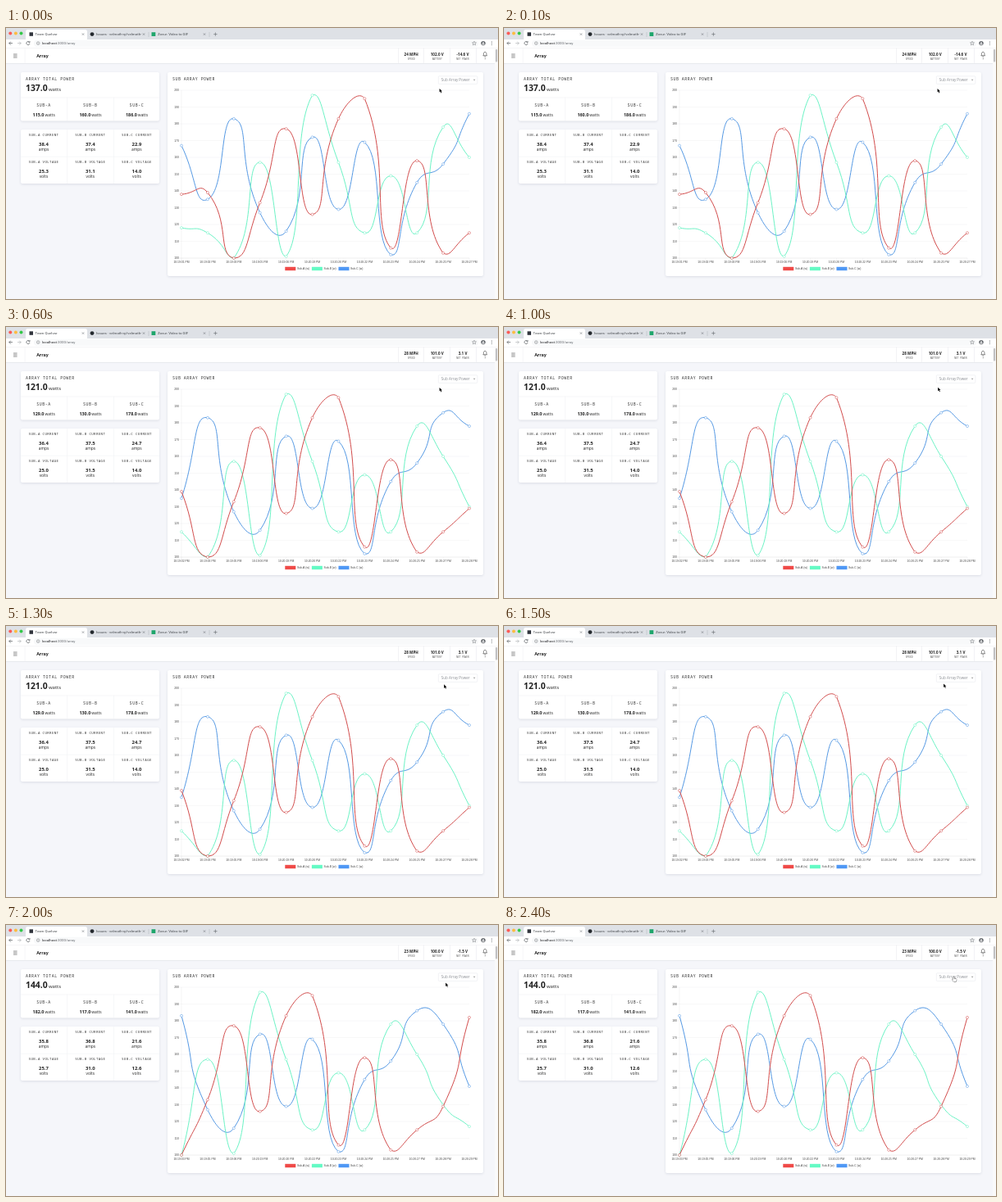
Animation, 600 px wide and 331 px high, one loop 2500 ms. Source, as an HTML page with a canvas:

```html
<!DOCTYPE html>
<html lang="en">
<head>
<meta charset="utf-8">
<title>Array dashboard</title>
<style>
html, body { margin: 0; width: 100%; height: 100%; overflow: hidden; }
canvas { display: block; width: 100vw; height: 100vh; }
</style>
</head>
<body>
<canvas></canvas>
<script>
const W = 600, H = 331, LOOP = 2500;
const canvas = document.querySelector('canvas');
const scale = window.devicePixelRatio || 1;
canvas.width = W * scale;
canvas.height = H * scale;
const ctx = canvas.getContext('2d');

const SANS = '"Open Sans", sans-serif';
const MONO = '"Noto Sans Mono", monospace';
const UI = 'Roboto, sans-serif';
const ARIAL = '"Liberation Sans", Arial, sans-serif';

const series = [
  { name: 'Sub-A (w)', line: '#d24c4c', fill: '#ef4a48',
    data: [138, 139, 100, 133, 177, 126, 183, 195, 106, 158, 103, 115, 129, 182] },
  { name: 'Sub-B (w)', line: '#6cf3c5', fill: '#64fac4',
    data: [118, 115, 100, 157, 101, 197, 157, 115, 149, 115, 178, 160, 130, 117] },
  { name: 'Sub-C (w)', line: '#5599e4', fill: '#4f98f5',
    data: [167, 135, 183, 127, 116, 172, 129, 169, 102, 145, 156, 186, 178, 141] },
];
const times = ['19:01', '19:02', '19:03', '19:05', '19:06', '20:19', '20:20',
  '20:22', '20:23', '20:24', '20:25', '20:27', '20:28', '20:29'];

const readings = [
  { total: '137.0', stats: ['24 MPH', '102.0 V', '-14.6 V'],
    current: ['38.4', '37.4', '22.9'], voltage: ['25.3', '31.1', '14.0'] },
  { total: '121.0', stats: ['28 MPH', '101.0 V', '3.1 V'],
    current: ['36.4', '37.5', '24.7'], voltage: ['25.0', '31.5', '14.0'] },
  { total: '144.0', stats: ['23 MPH', '100.0 V', '-1.5 V'],
    current: ['35.8', '36.8', '21.6'], voltage: ['25.7', '31.0', '12.6'] },
];

function text(str, x, y, size, { font = SANS, weight = 400, color = '#222', align = 'left', spacing = 0 } = {}) {
  ctx.font = `${weight} ${size}px ${font}`;
  ctx.letterSpacing = spacing + 'px';
  ctx.textAlign = align;
  ctx.fillStyle = color;
  ctx.fillText(str, x, y);
  return ctx.measureText(str).width;
}

function rect(x, y, w, h, color) {
  ctx.fillStyle = color;
  ctx.fillRect(x, y, w, h);
}

function rounded(x, y, w, h, r, color) {
  ctx.beginPath();
  ctx.roundRect(x, y, w, h, r);
  ctx.fillStyle = color;
  ctx.fill();
}

function dot(x, y, r, color) {
  ctx.beginPath();
  ctx.arc(x, y, r, 0, 7);
  ctx.fillStyle = color;
  ctx.fill();
}

function stroke(path, color, width = 0.7) {
  ctx.strokeStyle = color;
  ctx.lineWidth = width;
  ctx.stroke(new Path2D(path));
}

function card(x, y, w, h) {
  ctx.save();
  ctx.shadowColor = 'rgba(40, 50, 80, 0.12)';
  ctx.shadowBlur = 3 * scale;
  ctx.shadowOffsetY = scale;
  rounded(x, y, w, h, 2, '#fff');
  ctx.restore();
}

function browser() {
  rect(0, 0, W, 14, '#dee1e6');
  ['#fc5b57', '#fdbc40', '#34c84a'].forEach((c, i) => dot(5.3 + i * 6.6, 6.5, 2, c));
  rounded(24, 2, 75, 13, [2.5, 2.5, 0, 0], '#fff');
  rounded(28.5, 5.3, 4.5, 4.5, 0, '#30343c');
  dot(105, 7.6, 2.4, '#24292e');
  rounded(177.5, 5.2, 4.8, 4.8, 0, '#1fa66c');
  const tab = { font: UI, color: '#45494d' };
  text('Team Quelvar', 35.5, 9.2, 4.4, tab);
  text('Issues · velmoth-qi/velmoth-', 110, 9.2, 4.4, tab);
  text('Zovur: Video to GIF', 185, 9.2, 4.4, tab);
  [94, 168, 242].forEach(x => stroke(`M${x - 1.2} 6.4l2.4 2.4m0-2.4l-2.4 2.4`, '#5f6368', 0.5));
  stroke('M174 5v6M248 5v6', '#a5a9af', 0.4);
  stroke('M253.2 7.6h4.4M255.4 5.4v4.4', '#5f6368', 0.6);

  rect(0, 14, W, 10.5, '#fff');
  rounded(34, 14.8, 542, 8.2, 4.1, '#f8f9fa');
  ctx.save();
  ctx.translate(0, -0.4);
  stroke('M8 19H3.8m2-2l-2 2l2 2', '#55595e');
  stroke('M14 19h4.2m-2-2l2 2l-2 2', '#b0b3b7');
  stroke('M28.6 17.6a2.1 2.1 0 1 0 .4 1.9M29 16.4v1.8h-1.8', '#55595e');
  stroke('M37.4 19a1.8 1.8 0 1 0 3.6 0a1.8 1.8 0 1 0-3.6 0M39.2 18.8v1.2M39.2 17.8v.4', '#5f6368', 0.45);
  const host = text('localhost', 44, 20.6, 4.4, { font: UI, color: '#202124' });
  text(':3000/array', 44 + host, 20.6, 4.4, { font: UI, color: '#6a6e73' });
  stroke('M571 16.6l.7 1.6l1.8.1l-1.4 1.2l.5 1.7l-1.6-1l-1.6 1l.5-1.7l-1.4-1.2l1.8-.1z', '#5f6368', 0.45);
  dot(582, 19, 2.7, '#5f6368');
  dot(582, 18.2, 0.9, '#fff');
  rounded(580.4, 19.5, 3.2, 1.2, 0.6, '#fff');
  [17.2, 19, 20.8].forEach(y => dot(592.3, y, 0.5, '#5f6368'));
  ctx.restore();
  rect(0, 24, W, 0.5, '#dcdde0');
}

function header(stats) {
  rect(0, 24.5, W, 18.5, '#fff');
  rect(0, 43, W, 0.7, '#e3e5ea');
  stroke('M9 32h4.6M9 34h4.6M9 36h4.6', '#444', 0.6);
  rect(22.8, 24.5, 0.5, 18.5, '#ececf0');
  text('Array', 37.2, 36, 5.3, { weight: 700 });
  [478, 509.5, 541, 573].forEach(x => rect(x, 24.5, 0.5, 18.5, '#e4e5ea'));
  ['SPEED', 'BATTERY', 'NET POWER'].forEach((label, i) => {
    const x = [494.2, 525.7, 557][i];
    text(stats[i], x, 33.8, 4.6, { weight: 700, align: 'center' });
    text(label, x, 39, 2.9, { font: MONO, color: '#555', align: 'center' });
  });
  stroke('M581.8 33.8c1-.9.5-2 .8-3.2c.5-1.7 2.7-1.7 3.2 0c.3 1.2-.2 2.3.8 3.2zM583.5 34.6h1.4', '#333', 0.6);
  text('7', 584.2, 39.2, 3, { font: MONO, color: '#555', align: 'center' });
  rect(596, 24.5, 4, H - 24.5, '#fafafa');
  rounded(597, 26, 2.2, 15.5, 1.1, '#c1c1c3');
}

const CENTERS = [46, 102.8, 159.4];
const DIVIDER = '#f1f2f5';

function totals(step, total) {
  const label = { font: MONO, color: '#333', spacing: 0.58 };
  card(18, 54, 169, 59.5);
  text('ARRAY TOTAL POWER', 24, 63.7, 4.9, label);
  const w = text(total, 24, 76.6, 10.4, { weight: 700 });
  text('watts', 24 + w + 1.2, 76.6, 6);
  rect(18, 84.7, 169, 0.6, DIVIDER);
  [74.3, 131].forEach(x => rect(x, 84.7, 0.6, 28.8, DIVIDER));
  CENTERS.forEach((x, i) => {
    text('SUB-' + 'ABC'[i], x, 96.2, 4.9, { ...label, align: 'center' });
    const n = text(series[i].data[step + 11].toFixed(1), x - 13.4, 108.2, 5.4, { weight: 700 });
    text('watts', x - 13.4 + n + 1, 108.2, 4.9);
  });
}

function gauges(r) {
  card(18, 124, 169, 66);
  rect(18, 156.8, 169, 0.6, DIVIDER);
  [74.3, 131].forEach(x => rect(x, 124, 0.6, 66, DIVIDER));
  CENTERS.forEach((x, i) => {
    const row = (name, value, unit, y) => {
      text(`SUB-${'ABC'[i]} ${name}`, x, y, 4.1, { font: MONO, color: '#333', spacing: 0.38, align: 'center' });
      text(value, x, y + 12.1, 5.9, { weight: 700, align: 'center' });
      text(unit, x, y + 18.4, 4.9, { align: 'center' });
    };
    row('CURRENT', r.current[i], 'amps', 132);
    row('VOLTAGE', r.voltage[i], 'volts', 165);
  });
}

const LEFT = 214, RIGHT = 565, TOP = 76, BOTTOM = 281, COUNT = 12, TENSION = 0.6;
const px = i => LEFT + i * (RIGHT - LEFT) / (COUNT - 1);
const py = v => BOTTOM - (v - 100) * (BOTTOM - TOP) / 100;

// Spline handles, kept inside the plot area.
function handles(p, i) {
  const prev = p[i - 1] || p[i], next = p[i + 1] || p[i];
  const a = Math.hypot(p[i].x - prev.x, p[i].y - prev.y);
  const b = Math.hypot(next.x - p[i].x, next.y - p[i].y);
  const at = k => ({
    x: Math.min(RIGHT, Math.max(LEFT, p[i].x + k * (next.x - prev.x))),
    y: Math.min(BOTTOM, Math.max(TOP, p[i].y + k * (next.y - prev.y))),
  });
  return { before: at(-TENSION * a / (a + b)), after: at(TENSION * b / (a + b)) };
}

function curve(s, step) {
  const pts = s.data.slice(step, step + COUNT).map((v, i) => ({ x: px(i), y: py(v) }));
  const h = pts.map((_, i) => handles(pts, i));
  ctx.beginPath();
  ctx.moveTo(pts[0].x, pts[0].y);
  for (let i = 1; i < COUNT; i++) {
    const a = h[i - 1].after, b = h[i].before;
    ctx.bezierCurveTo(a.x, a.y, b.x, b.y, pts[i].x, pts[i].y);
  }
  ctx.strokeStyle = s.line;
  ctx.lineWidth = 1;
  ctx.stroke();
  ctx.lineWidth = 0.5;
  for (const p of pts) {
    dot(p.x, p.y, 1.55, '#fff');
    ctx.stroke();
  }
}

function chart(step) {
  card(197, 54, 385, 249);
  text('SUB ARRAY POWER', 203, 63.7, 4.9, { font: MONO, color: '#333', spacing: 0.53 });
  ctx.beginPath();
  ctx.roundRect(527.3, 58.8, 47.5, 9.6, 1);
  ctx.strokeStyle = '#e8eaee';
  ctx.lineWidth = 0.6;
  ctx.stroke();
  text('Sub Array Power', 530.8, 65.2, 4.5, { color: '#8a8d93' });
  ctx.fillStyle = '#999';
  ctx.fill(new Path2D('M569.8 62.8h2.6l-1.3 1.6z'));

  const tick = { font: ARIAL, color: '#444' };
  for (let v = 100; v <= 200; v += 10) {
    rect(LEFT - 2.8, py(v) - 0.2, RIGHT - LEFT + 2.8, 0.4, v === 100 ? '#d5d5d5' : '#ececee');
    text(v, LEFT - 3.2, py(v) + 1.2, 3.4, { ...tick, align: 'right' });
  }
  rect(LEFT - 0.2, TOP, 0.4, BOTTOM - TOP + 2.8, '#e3e3e5');
  for (let i = 0; i < COUNT; i++) {
    rect(px(i) - 0.2, BOTTOM, 0.4, 2.8, '#e6e6e8');
    text(`10:${times[step + i]} PM`, px(i), 287.3, 3.4, { ...tick, align: 'center' });
  }
  [...series].reverse().forEach(s => curve(s, step));
  series.forEach((s, i) => {
    const x = 340.3 + i * 32.6;
    rect(x, 291.8, 13, 4.4, s.fill);
    text(s.name, x + 14.6, 295.3, 3.4, tick);
  });
}

const ARROW = new Path2D('M0 0V4.6L1.1 3.6L1.9 5.4L2.7 5L1.9 3.3H3.3Z');
const HAND = new Path2D('M1.4.4Q2-.3 2.4.5V2.2L4.7 2.8Q5.3 3 5.1 3.8L4.6 6H1.9L.1 3.7Q-.1 2.9.8 3.1L1.4 3.6Z');

function smooth(t, from, to) {
  const u = Math.min(1, Math.max(0, (t - from) / (to - from)));
  return u * u * (3 - 2 * u);
}

function pointer(t) {
  const a = smooth(t, 900, 1500), b = smooth(t, 2200, 2400);
  const hand = t >= 2400;
  ctx.save();
  ctx.translate(528.6 + 7.5 * a + 10.6 * b, 74 - 3.6 * a - 7.2 * b);
  ctx.strokeStyle = hand ? '#111' : '#fff';
  ctx.lineWidth = 0.7;
  ctx.stroke(hand ? HAND : ARROW);
  ctx.fillStyle = hand ? '#fff' : '#000';
  ctx.fill(hand ? HAND : ARROW);
  ctx.restore();
}

function draw(now) {
  const t = Math.floor(now % LOOP / 100) * 100;
  const step = t < 300 ? 0 : t < 1600 ? 1 : 2;
  const r = readings[step];
  ctx.setTransform(canvas.width / W, 0, 0, canvas.height / H, 0, 0);
  rect(0, 0, W, H, '#f5f6fa');
  browser();
  header(r.stats);
  totals(step, r.total);
  gauges(r);
  chart(step);
  pointer(t);
  requestAnimationFrame(draw);
}
requestAnimationFrame(draw);
</script>
</body>
</html>
```
